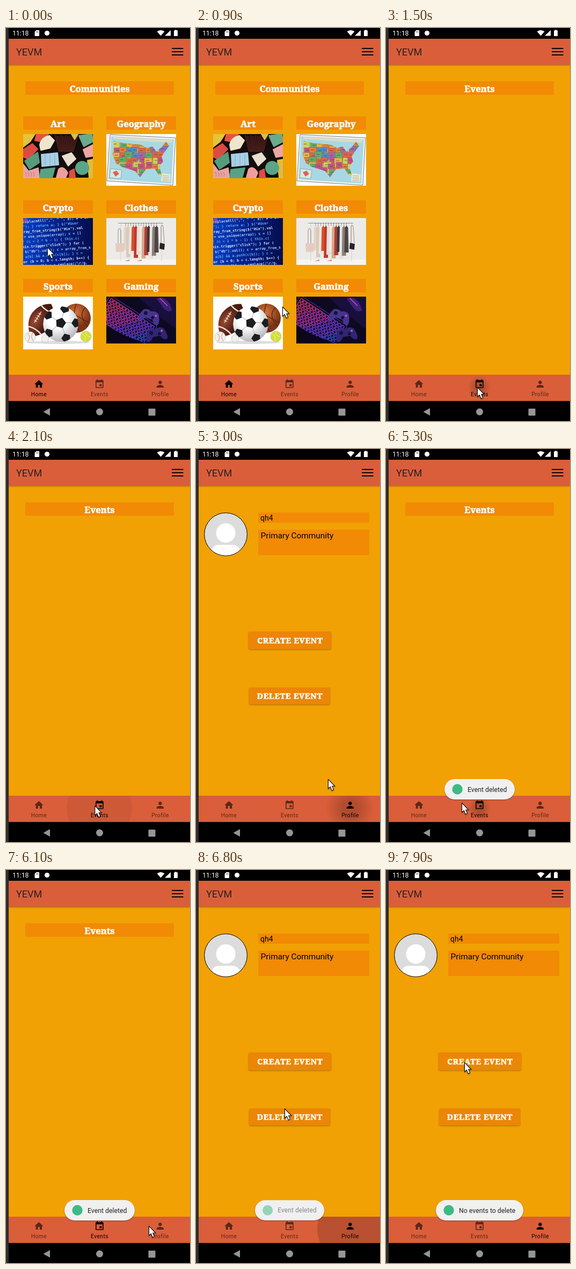
An HTML page that plays this animation: 343 px wide and 730 px high, repeating every 8000 ms.

```html
<!DOCTYPE html>
<html lang="en">
<head>
<meta charset="utf-8">
<title>Community app</title>
<style>
  html, body { margin: 0; width: 100%; height: 100%; overflow: hidden; background: #000; }
  svg { display: block; width: 343px; height: 730px; font-family: Roboto, sans-serif; }
  .head, .btn { font: bold 16.6px "Noto Serif", serif; fill: #fff; stroke: #fff; stroke-width: .7px; text-anchor: middle; }
  .btn { font-size: 14.6px; letter-spacing: .8px; }
  .tab text { font-size: 10.3px; letter-spacing: .4px; text-anchor: middle; }
  .toast text { font-size: 12.3px; fill: #222; }
  .code { font: bold 6.6px "DejaVu Sans Mono", monospace; }
</style>
</head>
<body>
<svg id="stage" viewBox="0 0 343 730" xmlns="http://www.w3.org/2000/svg"></svg>
<script>
const LOOP = 8000, FRAME = 100;
const stage = document.getElementById('stage');

const rect = (x, y, w, h, fill, more = '') =>
  `<rect x="${x}" y="${y}" width="${w}" height="${h}" fill="${fill}" ${more}/>`;
const circle = (x, y, r, fill, more = '') =>
  `<circle cx="${x}" cy="${y}" r="${r}" fill="${fill}" ${more}/>`;
const path = (d, fill, more = '') => `<path d="${d}" fill="${fill}" ${more}/>`;
const line = (d, stroke, width = 1) => path(d, 'none', `stroke="${stroke}" stroke-width="${width}"`);
const text = (x, y, s, more = '') => `<text x="${x}" y="${y}" ${more}>${s}</text>`;
const picture = (x, y, h, body) =>
  `<svg x="${x}" y="${y}" width="130" height="${h}" viewBox="0 0 130 ${h}" style="width:130px;height:${h}px">${body}</svg>`;
const repeat = (n, fn) => Array.from({ length: n }, (_, i) => fn(i)).join('');

function random(seed) {
  return () => (seed = (seed * 16807) % 2147483647) / 2147483647;
}

// Pictures on the home page
function art() {
  const pieces = [
    ['M0 0H22L13 14 0 24Z', '#e4c33f'], ['M25 0H47L34 14 22 12Z', '#e5533f'],
    ['M0 29 17 18 27 28 9 47 0 42Z', '#dc4b41'], ['M31 20Q34 6 49 3L58 12 50 26 33 30Z', '#eee5cf'],
    ['M3 50 27 34 30 53 12 65Z', '#559c7d'], ['M0 56 10 69 28 63 30 81H0Z', '#eaa3a2'],
    ['M34 38 64 35 66 57 35 60Z', '#a8cfe4'], ['M33 66 59 63 54 81H31Z', '#57a286'],
    ['M66 66Q74 57 83 72L79 81H62Z', '#ef9ea0'], ['M73 41 90 35 98 46 84 59Z', '#eadfcf'],
    ['M104 3 128 0 130 14 113 23Z', '#6aab8c'], ['M112 29 130 20V41L117 43Z', '#eda5a4'],
    ['M90 0H102L96 10Z', '#dfbd48'], ['M87 69 95 65 97 81H86Z', '#dd4e42'],
    ['M120 49 130 47V81H123Z', '#ddbd41']
  ];
  return rect(0, 0, 130, 81, '#130d0c') +
    repeat(14, i => line(`M${60 + i * 3.2} ${2 + (i % 3)}Q${64 + i * 2.5} 20 ${67 + i * 2} 33`, '#8f302d', .9)) +
    pieces.map(([d, c]) => path(d, c, `stroke="${c}" stroke-width="2" stroke-linejoin="round"`)).join('') +
    circle(110, 63, 13, '#59a588') +
    repeat(3, i => line(`M${41 + i * 9} 38v20`, '#6fa0bd', .7)) +
    repeat(4, i => line(`M${4 + i * 5} 70q3 5 1 9`, '#b45d64', .7));
}

function usMap() {
  const next = random(41);
  const hues = ['#e0634a', '#e9b23f', '#5fae68', '#4b8fc8', '#9b6bb0', '#e57f3a', '#cfcf5c', '#c9527f'];
  const land = 'M14 13 32 17 65 20 76 26 86 23 93 32 104 24 111 14 117 22 108 34 103 42 106 51 99 59 103 76 98 76 90 64 74 65 63 80 54 69 46 66 29 61 18 54 12 38Z';
  const states = repeat(63, i => {
    const x = 10 + (i % 9) * 12 + next() * 5, y = 12 + Math.floor(i / 9) * 10 + next() * 4;
    return rect(x, y, 10 + next() * 5, 9 + next() * 5, hues[Math.floor(next() * hues.length)], 'stroke="#6d6a70" stroke-width=".5"') +
      line(`M${x + 3} ${y + 5}h6`, '#453f50', .7);
  });
  return rect(0, 0, 130, 96, '#fff') +
    path('M7 1 129 7 124 95 1 87Z', '#f4f4f0', 'stroke="#444" stroke-width=".7"') +
    path('M9 4 126 10 121 92 4 84Z', '#a8d8e4') +
    path('M12 5 123 11 122 16 66 13 14 9Z', '#dcdcc4') +
    `<clipPath id="land"><path d="${land}"/></clipPath><g clip-path="url(#land)">${rect(0, 0, 130, 96, '#d8ba57')}${states}</g>` +
    path('M8 64 29 67 27 83 6 81Z', '#d7e9dc', 'stroke="#557" stroke-width=".4"') + path('M12 71l7-3 5 6-7 5Z', '#d5645f') +
    path('M104 73 120 75 118 89 102 87Z', '#eee9ce') +
    repeat(4, i => line(`M105 ${77 + i * 3}l12 1`, '#8d8b84', .6));
}

function code() {
  const rows = [
    '= replaceAll(",", " ", a); a = a.', ' " "); } return a; } $("#User', '  array_from_string($("#in").val',
    '   c = use_unique(array); c = []', ' if (c &lt; 2 * b - 1) { this.c(', '  this.trigger("click"); } for (',
    '= $("#b").val(); c = array_from_s', '   = a[b] &amp;&amp; a.push(c[b]); } c =', ' for (b = 0; b &lt; c.length; b++) {',
    'b -= 1, a[b] = c.replace(/\\r/g, '
  ];
  const hues = ['#a9d8ff', '#5fb2f6', '#d9ecfb'];
  return `<linearGradient id="screen"><stop stop-color="#0b3fc4"/><stop offset=".5" stop-color="#071f86"/><stop offset="1" stop-color="#050d4c"/></linearGradient>` +
    rect(0, 0, 130, 87, 'url(#screen)') +
    `<g class="code" transform="rotate(-4 65 44)" xml:space="preserve">` +
    rows.map((s, i) => text(-6, 5 + i * 9.3, s, `fill="${hues[i % 3]}"`)).join('') + '</g>' +
    circle(4, 5, 5, '#b74fae', 'opacity=".6"');
}

function clothes() {
  const hues = ['#e3d5c6', '#d8cbbd', '#efe6dc', '#d9512f', '#c2382c', '#e8ded3', '#f0ebe5', '#d9a98a', '#b23d33', '#3b393c', '#e9e4df', '#8a8079', '#4b4443'];
  return rect(0, 0, 130, 87, '#edebe8') + rect(0, 77, 130, 10, '#f6f4f2') +
    line('M22 9.500H106', '#77706c', .8) + line('M27 10V80M103 10V80', '#cbc6c2', .7) +
    hues.map((c, i) => {
      const x = 33 + i * 4.8, h = 46 + (i * 13) % 19;
      return line(`M${x + 3} 9v6`, '#555', .6) + path(`M${x} 18 ${x + 3} 14 ${x + 6} 18 ${x + 7} ${h + 14}H${x - 1}Z`, c) +
        line(`M${x + 5} 20V${h + 10}`, '#8d7f76', .3);
    }).join('') +
    line('M22 48V24q2-10 5 0v24M102 46V16q2-6 4 0l2 30', '#6d5f57', .7) +
    path('M17 47H34L32 63H18Z', '#e6cbc0') + path('M100 46l9 2-1 11-9-2Z', '#252326') +
    path('M34 80l9-3v3ZM56 80l10-3v3Z', '#b89d89');
}

function sports() {
  const pentagon = (x, y, r, turn) => {
    const pts = [0, 1, 2, 3, 4].map(i => {
      const a = i * Math.PI * .4 + turn;
      return `${x + r * Math.cos(a)} ${y + r * Math.sin(a)}`;
    });
    return path(`M${pts.join('L')}Z`, '#1c1d21');
  };
  const seams = repeat(5, i => {
    const a = i * Math.PI * .4 - 1.3, c = Math.cos(a), s = Math.sin(a);
    return line(`M70 49L${70 + 20 * c} ${49 + 20 * s}`, '#9a9ca2', .8) + pentagon(70 + 29 * c, 50 + 29 * s, 9, a + Math.PI);
  });
  const ball = (x, y, r, c) => circle(x, y, r, c, 'stroke="#a7a4a0" stroke-width=".5"');
  return `<radialGradient id="leather" cx=".4" cy=".3"><stop stop-color="#9c4b32"/><stop offset="1" stop-color="#48190f"/></radialGradient>` +
    `<radialGradient id="rubber" cx=".5" cy=".3"><stop stop-color="#d2733a"/><stop offset="1" stop-color="#7e3414"/></radialGradient>` +
    `<radialGradient id="shade" cx=".4" cy=".3" r=".75"><stop offset=".4" stop-color="#fff"/><stop offset="1" stop-color="#aeb0b6"/></radialGradient>` +
    rect(0, 0, 130, 98, '#fff') +
    `<ellipse cx="65" cy="85" rx="59" ry="3" fill="#ddd"/>` +
    circle(99, 40, 27, 'url(#rubber)') +
    line('M79 24Q100 36 124 49M99 13Q89 40 106 66M116 20Q101 35 120 55', '#43251b', 1.2) +
    `<g transform="translate(33 44) rotate(-58)">${path('M-36 0Q-18-23 4-21 26-18 36 0 26 18 4 21-18 23-36 0Z', 'url(#leather)')}` +
    line('M-22-14Q-17 0-22 14M24-15Q19 0 24 15', '#eee5dc', 2.5) +
    line('M-10-8H14M-6-11v6M-1-11v6M4-11v6M9-11v6', '#f0e8df', 1.3) + '</g>' +
    `<clipPath id="ball"><circle cx="70" cy="51" r="33"/></clipPath><g clip-path="url(#ball)">` +
    circle(70, 51, 33, 'url(#shade)') + seams + pentagon(70, 49, 10, -1.3) + '</g>' +
    ball(13, 75, 10, '#f2efe9') + line('M8 68q7 7 1 15M18 67q-5 8 1 15', '#bb6258', .7) +
    ball(41, 78, 7, '#eeeeee') + ball(117, 74, 10, '#d4dd36') + line('M110 69q8 4 5 14M117 65q-1 9 9 10', '#f3f2b0', 1);
}

function gaming() {
  const hues = ['#e0367f', '#c636b4', '#7b3ce0', '#2f5be0'];
  const keys = repeat(84, i => {
    const x = i % 14, y = Math.floor(i / 14), c = hues[Math.floor((x + y) / 5)];
    return rect(x * 7, y * 8, 5.2, 5.8, '#15122b', `rx="1" stroke="${c}" stroke-width="1.3"`);
  });
  const pad = (x, y, turn, c) => `<g transform="translate(${x} ${y}) rotate(${turn})">` +
    path('M-15-8Q-8-13 0-9 8-13 15-8 24 10 17 13 11 13 7 5H-7Q-11 13-17 13-24 10-15-8Z', c) +
    circle(-9, -3, 3.5, '#151238') + circle(6, 1, 3, '#151238') + circle(11, -4, 2, '#d94d9a') + '</g>';
  return rect(0, 0, 130, 87, '#0d0a20') + path('M60 0H130V60L90 30Z', '#190f3c') +
    `<g transform="translate(9 3) rotate(33)">${rect(-4, -4, 104, 55, '#07091c', 'rx="3" stroke="#5634ad"')}${keys}</g>` +
    path('M0 52Q40 80 83 87H0Z', '#0a081a') + line('M0 50Q43 73 73 87', '#4136bd', 1) +
    path('M94 4Q106-3 118 13L123 25Q116 31 107 22Z', '#392277') + line('M100 3 114 17', '#d84da9', 1.5) +
    pad(81, 36, 18, '#47348f') + pad(93, 69, -9, '#2f2676');
}

// Pages
const strip = s => rect(36, 99, 277, 25, '#f28a05') + text(174.5, 119, s, 'class="head"');
const cell = (x, y, s, h, body) =>
  rect(x, y, 130, 25, '#f28a05') + text(x + 65, y + 19.7, s, 'class="head"') + picture(x, y + 33, h, body);
const button = (id, x, y, w, h, s) =>
  `<g id="${id}" filter="url(#low)">${rect(x, y, w, h, '#eb8606', 'rx="3"')}</g>` +
  text(x + w / 2 + .4, y + h / 2 + 5.5, s, 'class="btn"');

const pages = [
  strip('Communities') +
    cell(32, 164, 'Art', 82, art()) + cell(187, 164, 'Geography', 97, usMap()) +
    cell(32, 320, 'Crypto', 87, code()) + cell(187, 320, 'Clothes', 87, clothes()) +
    cell(32, 466, 'Sports', 98, sports()) + cell(187, 466, 'Gaming', 87, gaming()),
  strip('Events'),
  `<clipPath id="face"><circle cx="55.5" cy="158.5" r="40"/></clipPath><g clip-path="url(#face)">` +
    circle(55.5, 158.5, 40, '#dcdcdc') + circle(55.5, 156, 18, '#fff') + rect(29, 178, 53, 30, '#fff', 'rx="13"') + '</g>' +
    circle(55.5, 158.5, 39.9, 'none', 'stroke="#000"') +
    rect(116, 118, 207, 19, '#f28a05') + text(120, 132.5, 'qh4', 'font-size="14"') +
    rect(116, 150, 207, 47, '#f28a05') + text(120.5, 166, 'Primary Community', 'font-size="15.4"'),
];
pages[2] += button('create', 98, 339, 154, 33, 'CREATE EVENT') + button('delete', 99, 443, 151, 31.5, 'DELETE EVENT');

const tabs = [
  [61, 'Home', 'M10 20v-6h4v6h5v-8h3L12 3 2 12h3v8z'],
  [174, 'Events', 'M17 12h-5v5h5v-5zM16 1v2H8V1H6v2H5c-1.1 0-2 .9-2 2v14c0 1.1.9 2 2 2h14c1.1 0 2-.9 2-2V5c0-1.1-.9-2-2-2h-1V1h-2zm3 18H5V8h14v11z'],
  [287, 'Profile', 'M12 12c2.2 0 4-1.8 4-4s-1.8-4-4-4-4 1.8-4 4 1.8 4 4 4zm0 2c-2.7 0-8 1.3-8 4v2h16v-2c0-2.7-5.3-4-8-4z']
];

const toast = (id, x, w, s) => `<g id="${id}" class="toast">` +
  `<g filter="url(#low)">${rect(x, 613, w, 38, '#f0f0f1', 'rx="19"')}</g>` +
  `<g class="content">${circle(x + 24, 632, 9.7, '#3dba83')}${text(x + 43, 636.5, s)}</g></g>`;

const shadow = (id, dy, blur, alpha) =>
  `<filter id="${id}" x="-10%" y="-30%" width="120%" height="170%" color-interpolation-filters="sRGB"><feDropShadow dx="0" dy="${dy}" stdDeviation="${blur}" flood-opacity="${alpha}"/></filter>`;

stage.innerHTML =
  `<defs>${shadow('low', 1, 1, .3)}${shadow('high', 2, 1.8, .4)}
    <radialGradient id="glow"><stop offset=".3"/><stop id="rim" offset="1"/></radialGradient>
    <clipPath id="bar"><rect x="5" y="644" width="338" height="48.500"/></clipPath></defs>` +
  rect(0, 0, 343, 730, '#000') + rect(5, 20, 338, 672.5, '#f1a104') +
  `<g filter="url(#low)">${rect(5, 20, 338, 48.5, '#da5e3a')}</g>` +
  rect(5, 0, 338, 20, '#000') +
  text(19, 50.7, 'YEVM', 'font-size="18" fill="#252021"') +
  line('M309 38h21.5M309 44h21.5M309 50h21.5', '#0b0606', 2.1) +
  text(12, 14, '11:18', 'font-size="12.2" fill="#fff"') +
  path('M56.5 4H61q1 0 1 1V14q0 1-1 1H54.5q-1 0-1-1V7Z', '#fff') +
  line('M57 6v2.5M59.5 6v2.5', '#000', .9) + circle(76.5, 9.5, 4.6, '#fff') +
  path('M281.5 6.5Q288.5 1.5 295.5 6.5L288.5 14.5ZM296 14.5 307 4V14.5ZM313 4.5H315V3.5H318V4.5H320V15H313Z', '#fff') +
  pages.map(p => `<g class="page">${p}</g>`).join('') +
  rect(5, 644, 338, 48.5, '#da5e3a') +
  `<g clip-path="url(#bar)"><circle id="ripple" cy="667" fill="url(#glow)"/></g>` +
  tabs.map(([x, s, d]) => `<g class="tab">${path(d, 'inherit', `transform="translate(${x - 9.5} 651.6) scale(.82)" style="fill:inherit"`)}${text(x + .5, 683.7, s)}</g>`).join('') +
  rect(0, 0, 5, 730, '#2d2d2e') +
  path('M69.5 713 82 706V720Z', '#969696') + circle(174.5, 713, 6.5, '#969696') + rect(265.5, 707, 13, 13, '#969696', 'rx="1"') +
  toast('deleted', 109, 131, 'Event deleted') + toast('nothing', 93, 163, 'No events to delete') +
  `<g id="cursor" filter="url(#low)"><path d="M.5.5V18L4.300 14.500 7.400 21.500 10.600 20 7.700 13.300H12.800Z" fill="#fff" stroke="#111" stroke-width="1.100"/></g>`;

// Timeline: [time, tab, head start of the ripple]
const visits = [[0, 0, -1], [1400, 1, 0], [3000, 2, 210], [5300, 1, 100], [6400, 2, 50]];
// [time, x, y]
const moves = [
  [0, 77, 407], [100, 75, 402], [200, 75, 402], [600, 118, 287], [800, 150, 420], [1000, 172, 615],
  [1100, 173, 654], [1200, 170, 667], [1900, 170, 667], [2200, 163, 660], [2300, 200, 633],
  [2400, 254, 661], [2900, 254, 661], [3000, 246, 613], [3200, 244, 600], [3800, 200, 454],
  [4100, 177, 467], [4600, 177, 467], [5000, 146, 660], [5300, 141, 657], [5500, 141, 657],
  [6100, 266, 661], [6200, 286, 663], [6400, 286, 663], [6800, 165, 443], [7200, 165, 450],
  [7300, 165, 450], [7700, 150, 343], [7900, 146, 357], [8000, 146, 357]
];

const $ = id => document.getElementById(id);
const clamp = v => Math.max(0, Math.min(1, v));
const pageEls = stage.querySelectorAll('.page'), tabEls = stage.querySelectorAll('.tab');

function cursorAt(t) {
  const i = moves.findIndex(m => m[0] > t);
  const [t0, x0, y0] = moves[i - 1], [t1, x1, y1] = moves[i];
  const k = (t - t0) / (t1 - t0);
  return [x0 + (x1 - x0) * k, y0 + (y1 - y0) * k];
}

function showToast(id, middle, fadeIn, fadeOut) {
  const el = $(id), k = Math.min(fadeIn, fadeOut);
  const s = .97 + .03 * k;
  el.style.display = k > 0 ? '' : 'none';
  el.setAttribute('transform', `translate(${middle} 632) scale(${s}) translate(${-middle} -632)`);
  el.querySelector('.content').style.opacity = k;
}

function render(t) {
  const [since, tab, lead] = visits.filter(v => v[0] <= t).pop();
  pageEls.forEach((el, i) => el.style.display = i === tab ? '' : 'none');
  tabEls.forEach((el, i) => el.style.fill = i === tab ? '#080302' : '#5a281b');

  const age = lead < 0 ? 0 : t - since + lead;
  const ripple = $('ripple');
  ripple.setAttribute('cx', tabs[tab][0]);
  ripple.setAttribute('r', 61 * clamp(age / 280));
  ripple.style.opacity = .19 * (1 - clamp((age - 350) / 500));
  $('rim').setAttribute('stop-opacity', clamp((age - 220) / 200));

  const pressed = (t >= 4300 && t < 4600) || (t >= 7100 && t < 7400);
  $('delete').setAttribute('filter', pressed ? 'url(#high)' : 'url(#low)');
  showToast('deleted', 174.5, clamp((t - 4300) / 200), clamp((6900 - t) / 200));
  showToast('nothing', 174.5, clamp((t - 7200) / 200), 1);
  $('cursor').setAttribute('transform', `translate(${cursorAt(t)})`);
}

const start = performance.now();
function tick() {
  const t = (performance.now() - start) % LOOP;
  render(Math.floor(t / FRAME) * FRAME);
  requestAnimationFrame(tick);
}
tick();
</script>
</body>
</html>
```
